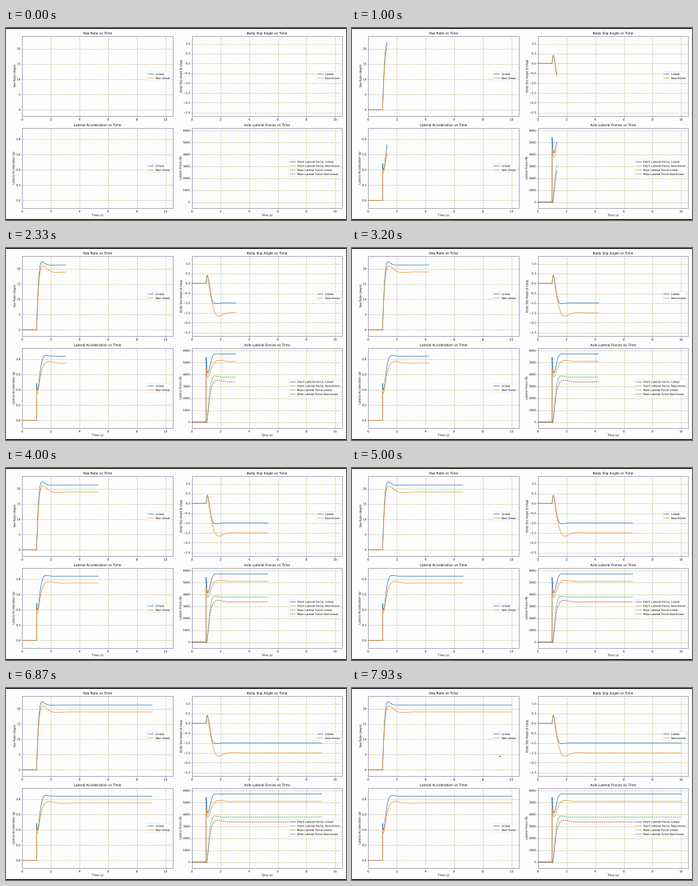
Animation of 426x240 px, one loop 8000 ms. Source, as a matplotlib script:

```python
import math

import numpy as np
import matplotlib.pyplot as plt
from matplotlib.animation import FuncAnimation
from matplotlib.collections import LineCollection, PathCollection
from matplotlib.patches import FancyBboxPatch, Rectangle
from matplotlib.textpath import TextPath
from matplotlib.transforms import Affine2D

W, H, DPI = 426, 240, 64
PX = 72 / DPI                 # one pixel in points
FRAMES, INTERVAL = 160, 50
RATE = 1.323                  # simulated seconds per second
DT, T_END, T_STEER = .002, 10, 1
SMALL, TITLE = 3.5, 4.2       # font sizes in pixels
AX_W, AX_H, T_MAX = 188.4, 100, 10.5
DASH = (0, (2.6, 1.2))
STYLES = [("#2a76ae", "-"), ("#ee922e", "-"), ("#3a9a3a", DASH), ("#a8404a", DASH)]

plt.rcParams["font.family"] = "DejaVu Sans"
fig = plt.figure(figsize=(W / DPI, H / DPI), dpi=DPI, facecolor="#fdfdfd")
ax = fig.add_axes([0, 0, 1, 1])
ax.set_xlim(0, W)
ax.set_ylim(H, 0)
ax.axis("off")

times = np.arange(0, T_END + DT / 2, DT)
grid, frame, glyphs, curves = [], [], [], []


def simulate(front_tyre, rear_tyre):
    """Single-track car in a step steer: yaw rate, slip, g, axle forces."""
    mass, inertia, speed = 1153, 1700, 22.2
    a, b, steer = .856, 1.29, .0639
    slip = yaw = 0
    rows = []
    for t in times:
        delta = steer if t >= T_STEER - DT / 2 else 0
        front = front_tyre(delta - slip - a * yaw / speed)
        rear = rear_tyre(b * yaw / speed - slip)
        accel = (front + rear) / mass
        rows.append((math.degrees(yaw), math.degrees(slip), accel / 9.81, front, rear))
        slip += DT * (accel / speed - yaw)
        yaw += DT * (a * front - b * rear) / inertia
    return np.array(rows).T


def linear(stiff):
    return lambda alpha: stiff * alpha


def saturating(stiff, peak):
    return lambda alpha: peak * math.tanh(stiff * alpha / peak)


def text_width(s, size=SMALL):
    return TextPath((0, 0), s, size=size).get_extents().width


def text(x, y, s, size=SMALL, align=0.5, turn=0):
    """Queue text with its baseline through (x, y); align 0 left, 1 right."""
    path = TextPath((0, 0), s, size=size)
    box = path.get_extents()
    shift = -(box.x0 + align * box.width)
    move = Affine2D().translate(shift, 0).rotate_deg(turn).scale(1, -1).translate(x, y)
    glyphs.append(path.transformed(move))


def stroke(xs, ys, style, z):
    color, dash = style
    return ax.plot(xs, ys, color=color, ls=dash, lw=.68 * PX, zorder=z,
                   snap=False, dash_capstyle="butt")[0]


def legend(names, right, mid):
    step = 5.15
    width = 9.8 + max(map(text_width, names))
    x = right - 3.2 - width
    y = mid - step * (len(names) - 1) / 2
    ax.add_patch(FancyBboxPatch(
        (x - 1.4, y - 3.2), width + 2.8, step * (len(names) - 1) + 6.4,
        boxstyle="round,pad=0,rounding_size=.7", fc=(1, 1, 1, .8),
        ec="#e6e6e6", lw=.5 * PX, zorder=4))
    for k, name in enumerate(names):
        row = y + k * step
        stroke([x, x + 7], [row, row], STYLES[k], 5)
        text(x + 9.8, row + 1.2, name, align=0)


def panel(left, top, title, label, low, high, step, names, series):
    right, bottom, mid = left + AX_W, top + AX_H, left + AX_W / 2

    def px(t):
        return left + t * AX_W / T_MAX

    def py(v):
        return bottom - (v - low) * AX_H / (high - low)

    text(mid, top - 2.2, title, TITLE)
    for v in range(0, 11, 2):
        x = px(v)
        grid.append([(x, bottom), (x, top)])
        frame.append([(x, bottom), (x, bottom + 1.3)])
        text(x, bottom + 5.5, str(v))
    widest = 0
    for k in range(math.ceil(low / step), math.floor(high / step) + 1):
        y = py(k * step)
        name = f"{k * step:.{int(step < 1)}f}".replace("-", "\u2212")
        widest = max(widest, text_width(name))
        grid.append([(left, y), (right, y)])
        frame.append([(left - 1.3, y), (left, y)])
        text(left - 2.5, y + 1.3, name, align=1)
    text(left - 4.7 - widest, top + AX_H / 2, label, turn=90)
    frame.append([(left, top), (right, top), (right, bottom), (left, bottom), (left, top)])
    if top > H / 2:
        text(mid, bottom + 10.2, "Time (s)")
    for style, values in zip(STYLES, series):
        curves.append((stroke([], [], style, 3), px(times), py(values)))
    legend(names, right, top + AX_H / 2)


lin = simulate(linear(85000), linear(97000))
non = simulate(saturating(85000, 6810), saturating(97000, 4470))
yaw, slip, accel, front, rear = zip(lin, non)

PAIR = ["Linear", "Non-linear"]
AXLES = ["Front Lateral Force, Linear", "Front Lateral Force, Non-linear",
         "Rear Lateral Force Linear", "Rear Lateral Force Non-linear"]
LEFT, RIGHT, TOP, BOTTOM = 20.4, 232.9, 10.2, 125

panel(LEFT, TOP, "Yaw Rate vs Time", "Yaw Rate (deg/s)", -2.1, 24.1, 5, PAIR, yaw)
panel(RIGHT, TOP, "Body Slip Angle vs Time", "Body Slip Angle β (deg)",
      -2.68, 1.38, .5, PAIR, slip)
panel(LEFT, BOTTOM, "Lateral Acceleration vs Time", "Lateral Acceleration (g)",
      -.1, .945, .2, PAIR, accel)
panel(RIGHT, BOTTOM, "Axle Lateral Forces vs Time", "Lateral Force (N)",
      -500, 6210, 1000, AXLES, front + rear)

# Grid dashes alternate between two pale tints.
for color, offset in (("#c6c6fa", 0), ("#e0e07c", 3)):
    ax.add_collection(LineCollection(grid, colors=color, linewidths=PX,
                                     linestyles=[(offset, (2, 4))], zorder=1))
ax.add_collection(LineCollection(frame, colors="#b2b2c4", linewidths=PX, zorder=2))
ax.add_collection(PathCollection(glyphs, facecolors="black", linewidths=0, zorder=6))
for y, h in ((0, 1), (238.7, 1.3)):
    ax.add_patch(Rectangle((0, y), W, h, fc="black", lw=0, zorder=7))
pointer, = ax.plot([185], [85], "o", color="black", ms=1.4 * PX, mew=0, zorder=8)


def draw(i):
    ms = i * INTERVAL
    n = int(min(T_END, RATE * ms / 1000) / DT) + 1 if i else 0
    for line, xs, ys in curves:
        line.set_data(xs[:n], ys[:n])
    pointer.set_visible(ms >= 7860)
    return [line for line, _, _ in curves] + [pointer]


anim = FuncAnimation(fig, draw, frames=FRAMES, interval=INTERVAL,
                     init_func=lambda: draw(0), repeat=True, repeat_delay=0)
plt.show()
```
